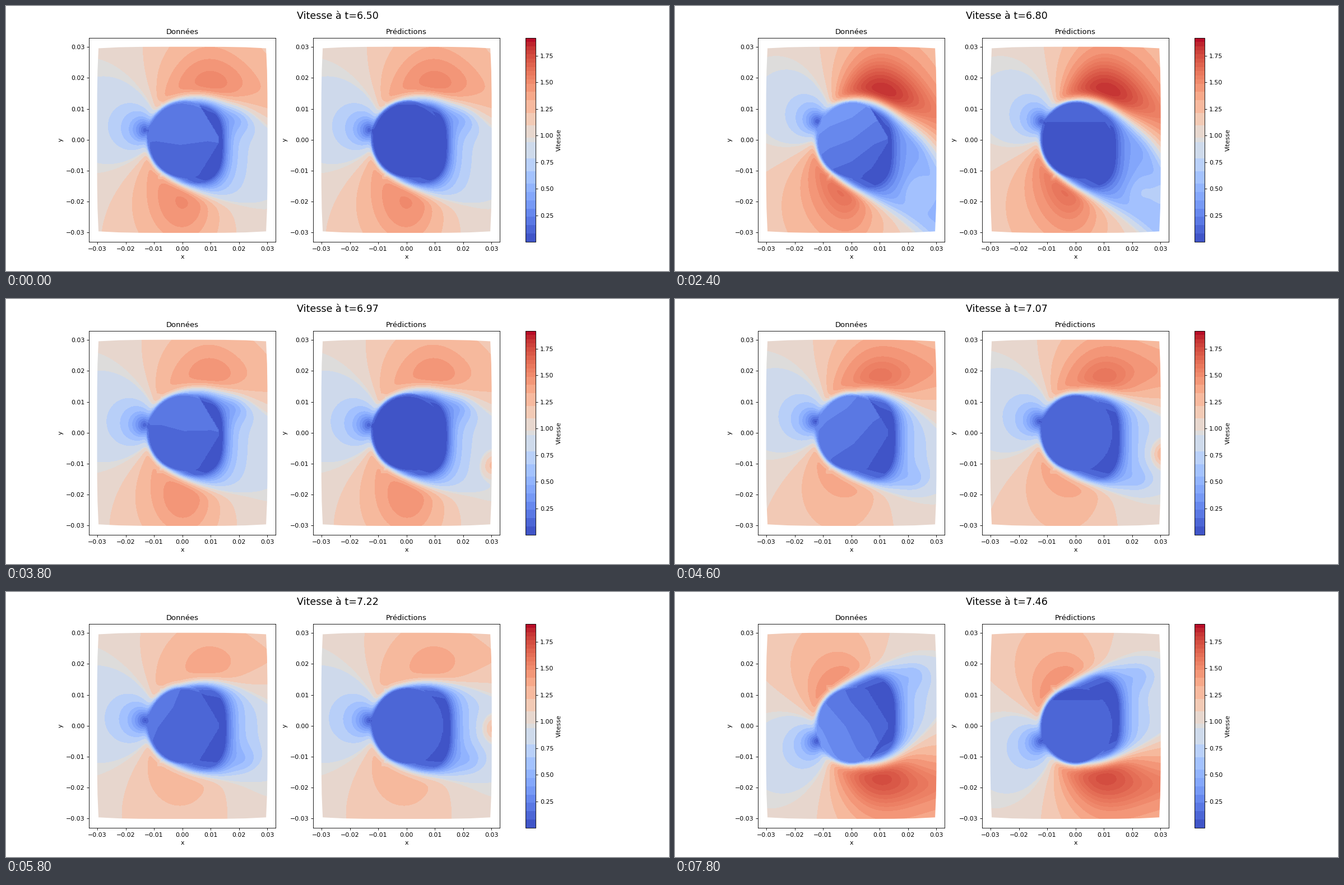
A matplotlib script that plays this animation: 1183x473 px, repeating every 8 s.

```python
import numpy as np
import matplotlib.pyplot as plt
from matplotlib.animation import FuncAnimation
from matplotlib.colors import BoundaryNorm, ListedColormap

DPI = 78.87
FRAMES, STEP_MS = 40, 200
RADIUS = 1.28          # cylinder radius; all lengths in hundredths
POT_R2 = 1.8           # squared radius of the outer potential flow
VMAX, BANDS = 1.92, 49

X, Y = np.meshgrid(np.linspace(-3.03, 3.03, 244), np.linspace(-3.03, 3.03, 266))
Z = X + 1j * Y
R = np.abs(Z)
Z_OUT = Z * np.maximum(1, np.sqrt(POT_R2) / np.maximum(R, 1e-3))
X_LAYER = np.maximum(X, -0.7)


def mix(a, b, t):
    return a + (b - a) * t


def bump(x, y, size, gain):
    return gain * np.exp(-((X - x) ** 2 + (Y - y) ** 2) / size ** 2)


def sway_at(i):
    """Swing of the wake: 1 fully down, -1 fully up."""
    return np.interp(i, [0, 12, 19, 23, 29, 39], [.5, 1, .4, .6, .27, -.85])


def roll_at(i):
    """0 while the wake is open, 1 once it has rolled up behind the cylinder."""
    t = np.clip((i - 19) / 4, 0, 1)
    return t * t * (3 - 2 * t)


def layer_distance(heights):
    """Signed distance above a shear layer given at four stations."""
    poly = np.polyfit([-0.7, 0.3, 1.6, 3.0], heights, 3)
    slope = np.polyval(np.polyder(poly), X_LAYER)
    return (Y - np.polyval(poly, X_LAYER)) / np.sqrt(1 + slope ** 2)


def wake_distance(sway, roll, predicted):
    """Signed distance outside the cylinder and its wake."""
    end_mid, end_half = (-1.0 * sway, 1.15) if predicted else (-1.5 * sway, 0.8)
    middle = np.array([0, -.2 * sway, mix(-.78, -.6, roll) * sway,
                       mix(-2.05 * sway * abs(sway) ** .6, end_mid, roll)])
    half = np.array([1.08, 1.5 - .08 * roll, 1.58 - .1 * roll,
                     mix(.75 + .65 * abs(sway), end_half, roll)])
    upper = layer_distance(middle + half)
    lower = layer_distance(middle - half)
    wake = np.maximum(np.maximum(upper, -lower), -0.7 - X)
    return np.minimum(wake, R - RADIUS)


def ridge(side, sway, roll):
    """Fast stream along the outside of one shear layer."""
    s = side * sway
    y = 1.75 + .4 * (1 - abs(s)) - .12 * X ** 2 * s * (1 - roll)
    gain = max(0, .1 + .38 * s) / (1 + np.exp(-2 * (X - .2)))
    return gain / (1 + ((side * Y - y) / 1.2) ** 2)


def outer_speed(sway, roll):
    turn = np.exp(-1j * np.radians(26 * sway))
    pot = np.abs(1 / turn - POT_R2 * turn / Z_OUT ** 2)
    limit = .15 + .27 * abs(sway)
    pot = np.where(pot > 1, 1 + limit * np.tanh((pot - 1) / limit), pot)
    return ((1 + .08 * abs(sway)) * pot + ridge(1, sway, roll) + ridge(-1, sway, roll)
            + bump(.1, -2.4, 1.4, .2 * (1 - roll)))


def wake_speed(i, sway, roll, predicted):
    core = (np.abs(X - .15) ** 3 + np.abs(Y + .3 * sway) ** 3) ** (1 / 3)
    gap = np.maximum(core - 1.25 - .12 * roll, 0)
    growth = 1 - np.exp(-gap / (.4 + .1 * roll))
    far = .87 - (1 - roll) * max(0, .68 * (sway - .5))
    swing = 2 * sway - 1
    spots = (1 - roll) * (bump(2 + .6 * swing, .8 - .8 * swing, .6, -.3 + .18 * swing)
                          + bump(2.3, -1.7, .5, .17 * max(0, swing)))
    spots = spots + bump(2.2, -1.7 * np.tanh(3 * sway), .5, -.2 * roll)
    if predicted:
        spots = spots + bump(3.1, .1 * i - 3, .45, .55 * np.exp(-((i - 24) / 12) ** 2))
    return .06 + growth * (far - .06 + spots)


def body_speed(sway, roll, predicted):
    if predicted:
        return .065 + .03 * roll + .03 * sway * Y / RADIUS
    angle = mix(62 + 56 * sway, 165 - 60 * sway, roll)
    turned = Z / np.exp(1j * np.radians(angle))
    zigzag = np.abs((1.1 * turned.imag + .6 * turned.real) % 2 - 1)
    return .1 + .12 * abs(sway) + .16 * abs(sway) * (turned.real + .12 * zigzag) / RADIUS


def field(i, predicted):
    sway, roll = sway_at(i), roll_at(i)
    width = .1 + .05 * np.maximum(X + 1.3, 0)
    outside = .5 * (1 + np.tanh(wake_distance(sway, roll, predicted) / width))
    outside *= np.clip((R - 1.18) / .1, 0, 1)
    body = R < RADIUS
    if not predicted:
        body &= .75 * X + .5 * np.abs(Y) < 1
    inside = np.where(body, body_speed(sway, roll, predicted),
                      wake_speed(i, sway, roll, predicted))
    return np.clip(mix(inside, outer_speed(sway, roll), outside), .005, VMAX - .005)


# Colour bands are wider in the pale middle than at the red end.
edges = np.array([*range(0, 15, 2), 17, 20, 24, 25, 28, 31, 34, 36, 38,
                  *range(39, BANDS + 1)])
mids = (edges[:-1] + edges[1:]) / 2 / BANDS
cmap = ListedColormap(plt.get_cmap("coolwarm")(mids))
norm = BoundaryNorm(edges * VMAX / BANDS, cmap.N)

plt.rcParams["font.family"] = "DejaVu Sans"
fig, axes = plt.subplots(1, 2, figsize=(1183.001 / DPI, 473.001 / DPI), dpi=DPI)
fig.patch.set_facecolor("white")
title = fig.suptitle("", fontsize=16)
bar = fig.colorbar(plt.cm.ScalarMappable(norm, cmap), ax=list(axes), label="Vitesse",
                   spacing="proportional", ticks=np.arange(1, 8) / 4, format="%.2f")
bar.minorticks_off()

# The mesh is a square with slightly bowed sides.
side = np.linspace(-1, 1, 9)
bow = 3.01 - .05 * side ** 4
outline = np.concatenate([np.c_[2.98 * side, bow], np.c_[bow, -2.96 * side],
                          np.c_[-2.98 * side, -bow], np.c_[-bow, 2.96 * side]]) / 100
ticks = np.arange(-3, 4) / 100

images = []
for ax, name in zip(axes, ("Données", "Prédictions")):
    im = ax.imshow(np.zeros_like(X), cmap=cmap, norm=norm, origin="lower",
                   extent=[-.0303, .0303, -.0303, .0303], aspect="auto",
                   interpolation="bilinear")
    im.set_clip_path(plt.Polygon(outline, transform=ax.transData))
    ax.set(title=name, xlabel="x", ylabel="y", xlim=(-.033, .033), ylim=(-.033, .033),
           xticks=ticks, yticks=ticks)
    images.append(im)


def draw(i):
    title.set_text(f"Vitesse à t={6.499 + 0.02475 * i:.2f}")
    for im, predicted in zip(images, (False, True)):
        im.set_data(field(i, predicted))
    return [title, *images]


anim = FuncAnimation(fig, draw, frames=FRAMES, interval=STEP_MS, repeat=True,
                     repeat_delay=0, blit=False)
plt.show()
```
